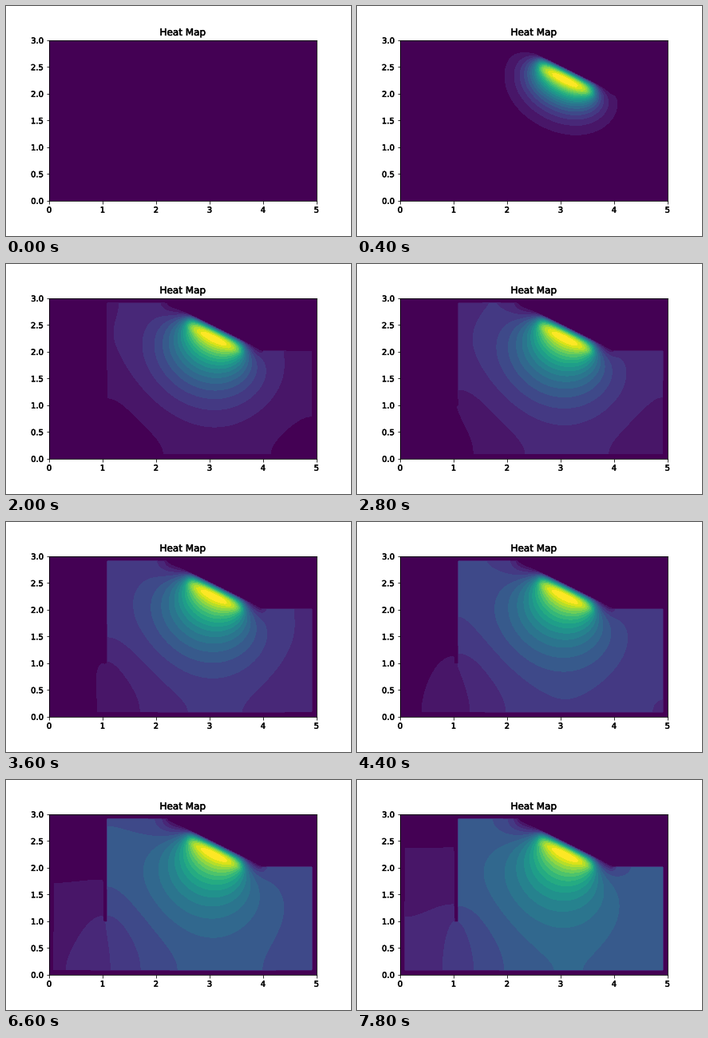
A matplotlib script that plays this animation: 432x288 px, repeating every 8000 ms.

```python
import numpy as np
import matplotlib.pyplot as plt
from matplotlib import patheffects
from matplotlib.animation import FuncAnimation

FRAMES, INTERVAL = 40, 200
BANDS = 19
DX = 0.025
DIFFUSION = 0.083      # area units per frame
STEPS = 580            # solver steps per frame
ROOF_LOSS = 0.5        # share of heat that passes the sloped roof
EPS = 1e-6

xs = np.arange(201) * DX
ys = np.arange(121) * DX
X, Y = np.meshgrid(xs, ys)


def between(values, low, high):
    return (values > low - EPS) & (values < high + EPS)


def build_room():
    """Masks of the open cells, the cold sloped roof and the heater."""
    slope = 4 - X / 2
    inside = between(X, 0.1, 4.9) & between(Y, 0.1, 2.9)
    below_roof = Y < np.maximum(2, slope) + EPS
    wall = (X > 1 + EPS) & (X < 1.1 - EPS) & (Y > 1 - EPS)
    open_ = inside & below_roof & ~wall
    roof = ~below_roof & (X > 2.2 + EPS) & (X < 4 - EPS) & (Y < 2.9 + EPS)
    heater = between(X, 2.6, 3.6) & between(slope - Y, 0.05, 0.25)
    return open_, roof, heater


def count_neighbours(mask):
    cells = mask.astype(int)
    total = np.zeros_like(cells)
    for axis in (0, 1):
        for shift in (1, -1):
            total += np.roll(cells, shift, axis)
    return total


def simulate():
    open_, roof, heater = build_room()
    k = np.float32(DIFFUSION / DX**2 / STEPS)
    gx = k * (open_[:, 1:] & open_[:, :-1]).astype(np.float32)
    gy = k * (open_[1:] & open_[:-1]).astype(np.float32)
    keep = (1 - ROOF_LOSS * k * count_neighbours(roof) * open_).astype(np.float32)
    heat = ((heater & open_) / STEPS).astype(np.float32)

    t = np.zeros(X.shape, np.float32)
    states = [t.copy()]
    for _ in range(FRAMES - 1):
        for _ in range(STEPS):
            fx = t[:, 1:] - t[:, :-1]
            fy = t[1:] - t[:-1]
            fx *= gx
            fy *= gy
            t *= keep
            t += heat
            t[:, :-1] += fx
            t[:, 1:] -= fx
            t[:-1] += fy
            t[1:] -= fy
        states.append(t.copy())
    return states


states = simulate()
cmap = plt.get_cmap("viridis")
colors = [cmap(i / (BANDS - 1)) for i in range(BANDS)]

plt.rcParams.update({"font.family": "DejaVu Sans", "font.size": 10})
fig = plt.figure(figsize=(6, 4), dpi=72, facecolor="white")
ax = fig.add_axes([0.125, 0.125, 0.775, 0.755])
ax.set_facecolor(colors[0])
ax.set_aspect("equal")
ax.set_xlim(0, 5)
ax.set_ylim(0, 3)
ax.set_xticks(range(6))
ax.set_yticks(np.arange(0, 3.1, 0.5))
title = ax.set_title("Heat Map", fontsize=12)

heavy = [patheffects.withStroke(linewidth=0.5, foreground="black")]
for label in [title, *ax.get_xticklabels(), *ax.get_yticklabels()]:
    label.set_path_effects(heavy)

shown = []


def clear():
    while shown:
        shown.pop().remove()
    return []


def draw(frame):
    clear()
    field = states[frame]
    top = float(field.max())
    if top > 0:
        levels = np.linspace(0, top * 1.0001, BANDS + 1)
        shown.append(ax.contourf(X, Y, field, levels=levels, colors=colors))
    return shown


anim = FuncAnimation(fig, draw, frames=FRAMES, init_func=clear,
                     interval=INTERVAL, repeat=True, repeat_delay=0)
plt.show()
```
